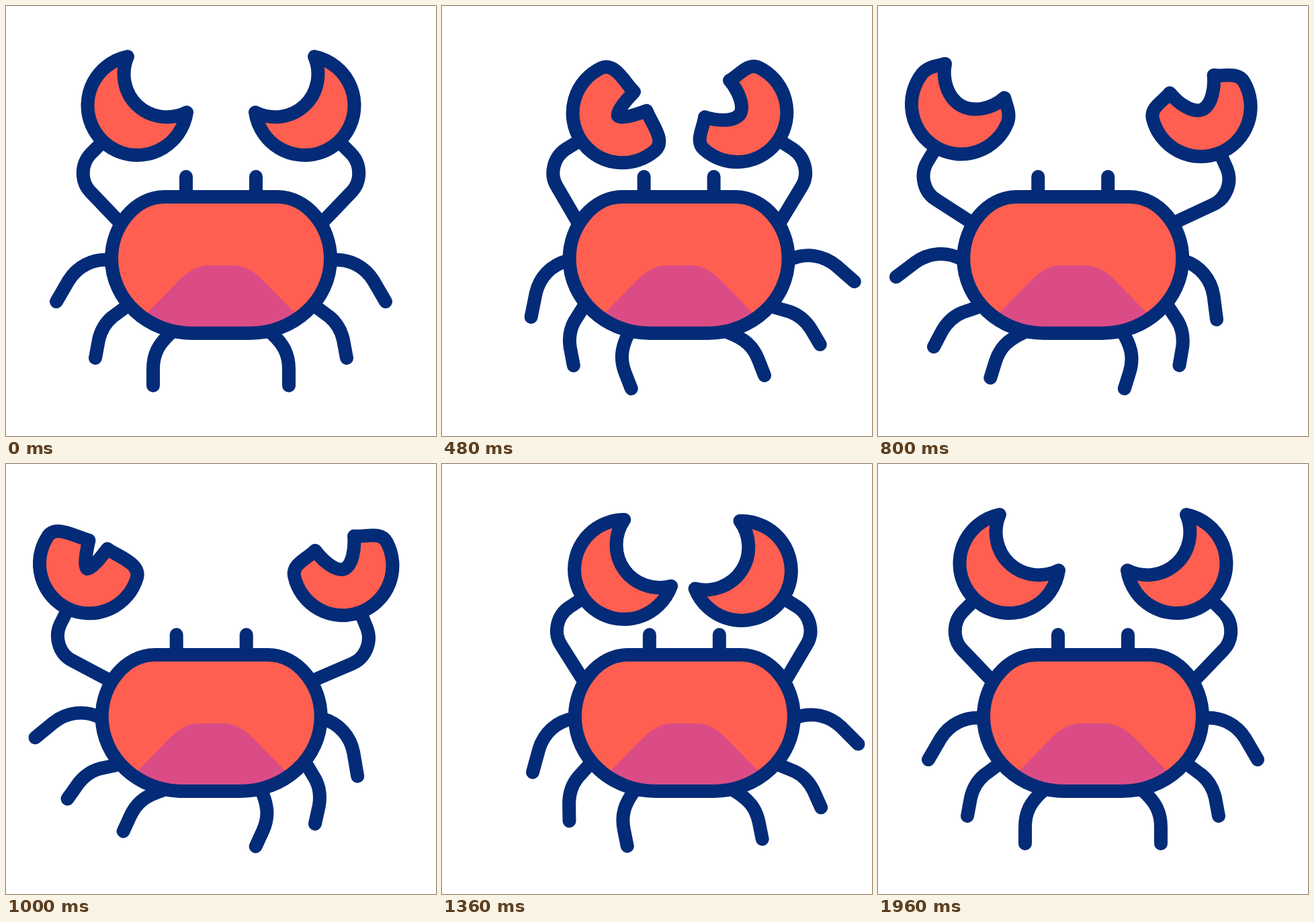
These frames come from a looping animation (640 px wide and 640 px high, 2000 ms). An HTML page:

```html
<!DOCTYPE html>
<html lang="en">
<head>
<meta charset="utf-8">
<title>Crab</title>
<style>
html, body { margin: 0; width: 100%; height: 100%; overflow: hidden; background: #fff; }
svg { display: block; width: 100vw; height: 100vh; }
.line { fill: none; stroke: #032b77; stroke-width: 20; stroke-linecap: round; stroke-linejoin: round; }
.shell { fill: #ff5f50; }
.belly { fill: #db4c87; }
</style>
</head>
<body>
<svg viewBox="0 0 640 640">
  <defs>
    <path id="body" d="M236 284H404C448 284 483 328 483 376C483 437 429 487 363 487H277C211 487 157 437 157 376C157 328 192 284 236 284Z"/>
    <clipPath id="inside"><use href="#body"/></clipPath>
  </defs>
  <g id="crab">
    <g id="left"></g>
    <g id="right" transform="translate(640 0) scale(-1 1)"></g>
    <path class="line" d="M268 254V284M372 254V284"/>
    <use href="#body" class="shell"/>
    <path class="belly" clip-path="url(#inside)" d="M207 460L258 408C273 393 286 386 304 386H336C354 386 367 393 382 408L433 460V490H207Z"/>
    <use href="#body" class="line"/>
  </g>
</svg>
<script>
const LOOP = 2000, STEP = 40;
const byId = id => document.getElementById(id);
const mix = (a, b, k) => a + (b - a) * k;
const ease = u => (1 - Math.cos(Math.PI * u)) / 2;

// Limbs are drawn for the left side; the right side is mirrored.
const LEGS = [
  { pivot: '157 376', d: 'M154 378C128 376 106 388 93 409L75 440' },
  { pivot: '178 449', d: 'M177 449L158 463C146 473 141 484 138 497L133 524' },
  { pivot: '246 487', d: 'M246 486C227 503 219 518 219 540V565' }
];
const ARM = 'M171 324L126 277C111 262 111 236 126 220L142 204';

const SIDES = [
  { id: 'left', turn: -1, spread: 1, reach: -19.5, snapLag: 40 },
  { id: 'right', turn: 1, spread: .5, reach: -26, snapLag: 0 }
];

// Rest, three peaks, rest; a lag of 1 delays each beat a little more than the last.
const BEATS = [40, 400, 880, 1380, 1860];
function swing(t, peaks, lag = 0) {
  const values = [0, ...peaks, 0];
  const times = BEATS.map((beat, i) => beat + lag * 20 * (i + 1));
  const i = times.findIndex(time => t < time);
  if (i < 1) return 0;
  return mix(values[i - 1], values[i], ease((t - times[i - 1]) / (times[i] - times[i - 1])));
}

// Two snaps per loop, each 200 ms to close and 200 ms to open.
const snap = t => [380, 905].reduce((sum, mid) => sum + ease(Math.max(0, 1 - Math.abs(t - mid) / 200)), 0);

// Claw around its centre, pointing up: k = 0 is a crescent, k = 1 is shut.
function clawPath(k) {
  const R = 74, hinge = 1.43, slant = mix(.957, .05, k);
  const out = mix(11.7, 20, k), bulge = mix(11.7, 25, k);
  const tip = [mix(60.5, 5.5, k), mix(-43, -29, k)];
  const tipIn = [tip[0] - mix(9.2, 2, k), tip[1] + mix(25.4, 13, k)];
  const tipOut = [tip[0] + out * Math.cos(slant), tip[1] + out * Math.sin(slant)];
  const base = [R * Math.sin(hinge), -R * Math.cos(hinge)];
  const baseOut = [base[0] - bulge * Math.cos(hinge), base[1] - bulge * Math.sin(hinge)];
  const notch = [0, 10 * k], notchOut = [mix(27, 2, k), 8 * k];
  const flip = ([x, y]) => [-x, y];
  return `M${flip(tip)}C${flip(tipIn)} ${flip(notchOut)} ${notch}C${notchOut} ${tipIn} ${tip}` +
    `C${tipOut} ${baseOut} ${base}A${R} ${R} 0 1 1 ${flip(base)}C${flip(baseOut)} ${flip(tipOut)} ${flip(tip)}Z`;
}

function add(parent, tag, attrs = {}) {
  const el = document.createElementNS('http://www.w3.org/2000/svg', tag);
  for (const key in attrs) el.setAttribute(key, attrs[key]);
  return parent.appendChild(el);
}

for (const side of SIDES) {
  const root = byId(side.id);
  side.legs = LEGS.map(leg => add(root, 'path', { class: 'line', d: leg.d }));
  side.arm = add(root, 'g');
  add(side.arm, 'path', { class: 'line', d: ARM });
  side.claw = add(side.arm, 'path',
    { class: 'line', style: 'fill:#ff5f50', transform: 'translate(195.5 148) rotate(43.3)' });
}

function draw(t) {
  byId('crab').setAttribute('transform', `translate(${swing(t + 40, [43.5, -31, 41])} 0)`);
  for (const side of SIDES) {
    side.legs.forEach((leg, i) => {
      const angle = side.turn * swing(t, [22, -26, 15], Math.min(1, i * side.spread));
      leg.setAttribute('transform', `rotate(${angle} ${LEGS[i].pivot})`);
    });
    const lift = swing(t, [14, side.reach, 14.5], side.spread);
    side.arm.setAttribute('transform', `rotate(${lift} 168 325)`);
    side.claw.setAttribute('d', clawPath(snap(t - side.snapLag)));
  }
}

const start = performance.now();
function tick() {
  const t = (performance.now() - start) % LOOP;
  draw(Math.floor(t / STEP) * STEP);
  requestAnimationFrame(tick);
}
tick();
</script>
</body>
</html>
```
